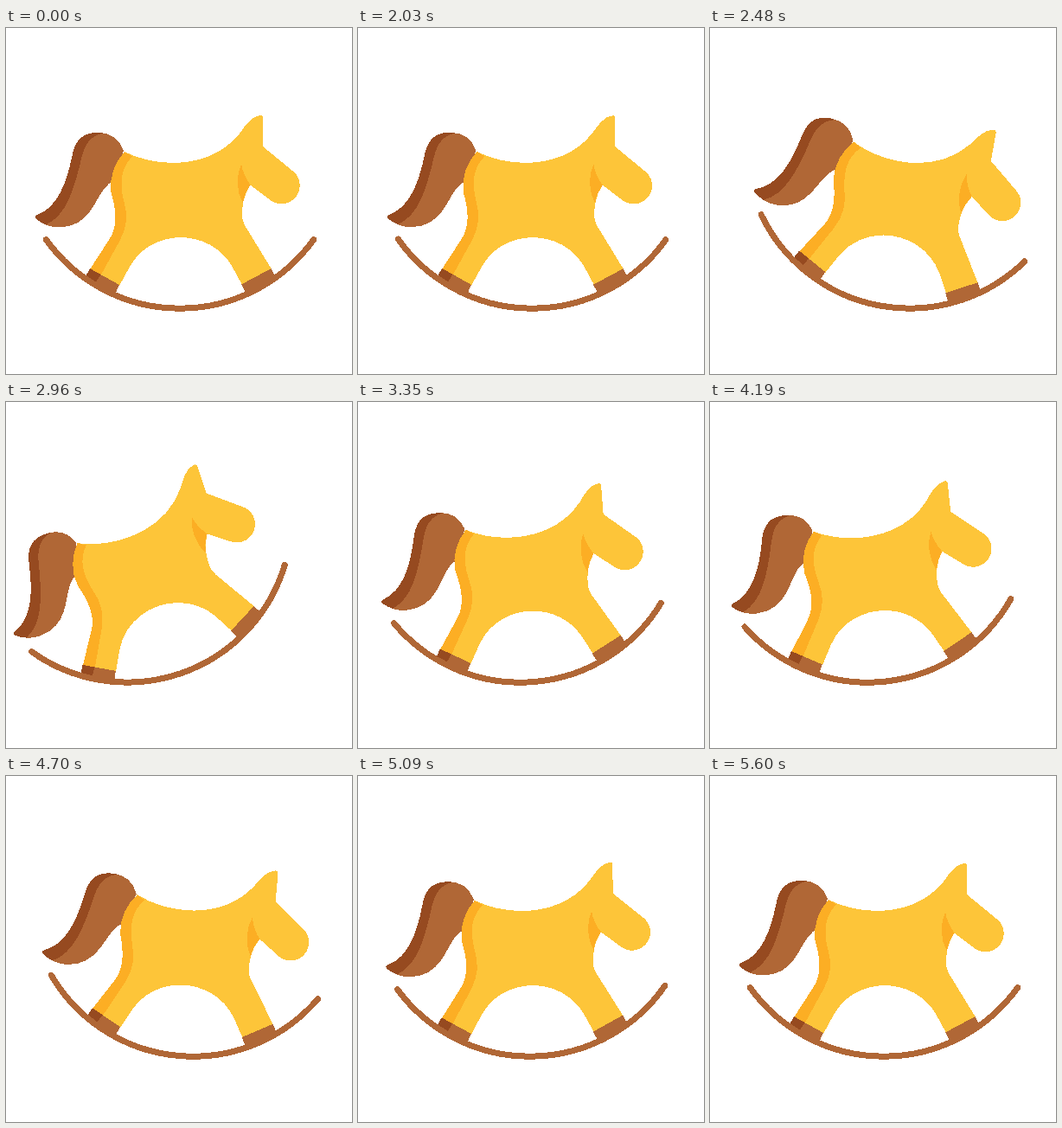
An HTML page that plays this animation: 400 by 400 pixels, repeating every 5.63 s.

```html
<!DOCTYPE html>
<html lang="en">
<head>
<meta charset="utf-8">
<title>Rocking horse</title>
<style>
  html, body { margin: 0; width: 100%; height: 100%; overflow: hidden; background: #fff; }
  svg { display: block; width: 100vw; height: 100vh; shape-rendering: crispEdges; }
  .coat { fill: #fdc539; }
  .coat-shade { fill: #fcae24; }
  .wood { fill: #b06736; }
  .wood-shade { fill: #964a20; }
  .rocker { fill: none; stroke: #b06736; stroke-width: 7; stroke-linecap: round; }
</style>
</head>
<body>
<svg viewBox="0 0 400 400">
  <g id="horse">
    <path class="wood" d="M136 142C131 128 121 121 106 121C88 121 79 133 76 150C70 178 60 208 35 216.500Q32 218.500 35 221C44 228 52 230.500 62 230.500C96 229.500 102 200 114 185Q118 180 124 177Z"/>
    <path class="wood-shade" d="M112 121.500C86 118 79 133 76 150C70 178 60 208 35 216.500Q32 218.500 35 221Q40 225 46 227.500C70 217 78 186 85 160C89 142 92 126 112 121.500Z"/>
    <path class="coat" d="M137 143C174 162 237 164 270.500 121.500C277 112 284 102 294 101Q297 101 297 104V137L330.500 164.500A21.200 21.200 0 0 1 306.500 199.500L282.500 181.500C274 194 273 206 273 218Q274 226 279 233L306.500 278L273 297L261 275C235 231 168 231 143 276L131 298L97 279L119 245C130 229 127 209 121.500 190C119 172 126 155 137 143Z"/>
    <path class="coat-shade" d="M137 143L146 148.500C133 162 131 178 136 199C141 217 140 229 132 245L109.500 286L97 279L119 245C130 229 127 209 121.500 190C119 172 126 155 137 143Z"/>
    <path class="coat-shade" d="M272 157C266 170 266 189 274 203Q275 192 282.500 181.500Q274 170 272 157Z"/>
    <path class="wood" d="M97 278L131 297L126 308L91 289ZM306.500 278L272 296.500L278 308L312.500 289Z"/>
    <path class="wood-shade" d="M97 278L109.500 285L102.500 296L91 289Z"/>
    <path class="rocker" d="M46.300 244.500A190 190 0 0 0 355.700 244.500"/>
  </g>
</svg>
<script>
const LOOP = 5630, START = 2030, STEP = 30;
const AXIS = { x: 201, y: 132.7 };

// Turning points of the swing: [time in ms, angle in degrees]
const swing = [
  [2000, 0], [2430, 10.6], [3050, -20.5], [3630, 10.2],
  [4220, -6.1], [4680, 5.1], [5230, -1.8], [5600, 0]
];

const horse = document.getElementById('horse');

function angleAt(t) {
  const i = swing.findIndex(([time]) => time > t);
  if (i < 1) return 0;
  const [t0, a0] = swing[i - 1], [t1, a1] = swing[i];
  const ease = (1 - Math.cos(Math.PI * (t - t0) / (t1 - t0))) / 2;
  return a0 + (a1 - a0) * ease;
}

function pose(angle) {
  const r = angle * Math.PI / 180;
  const roll = 175.8 * r - 30.4 * r * r;
  horse.setAttribute('transform',
    `translate(${roll.toFixed(3)} 0) rotate(${angle.toFixed(3)} ${AXIS.x} ${AXIS.y})`);
}

const begin = performance.now();

function draw(now) {
  const t = Math.max(0, now - begin) % LOOP;
  const held = t < START ? 0 : START + Math.floor((t - START) / STEP) * STEP;
  pose(angleAt(held));
  requestAnimationFrame(draw);
}

draw(begin);
</script>
</body>
</html>
```
